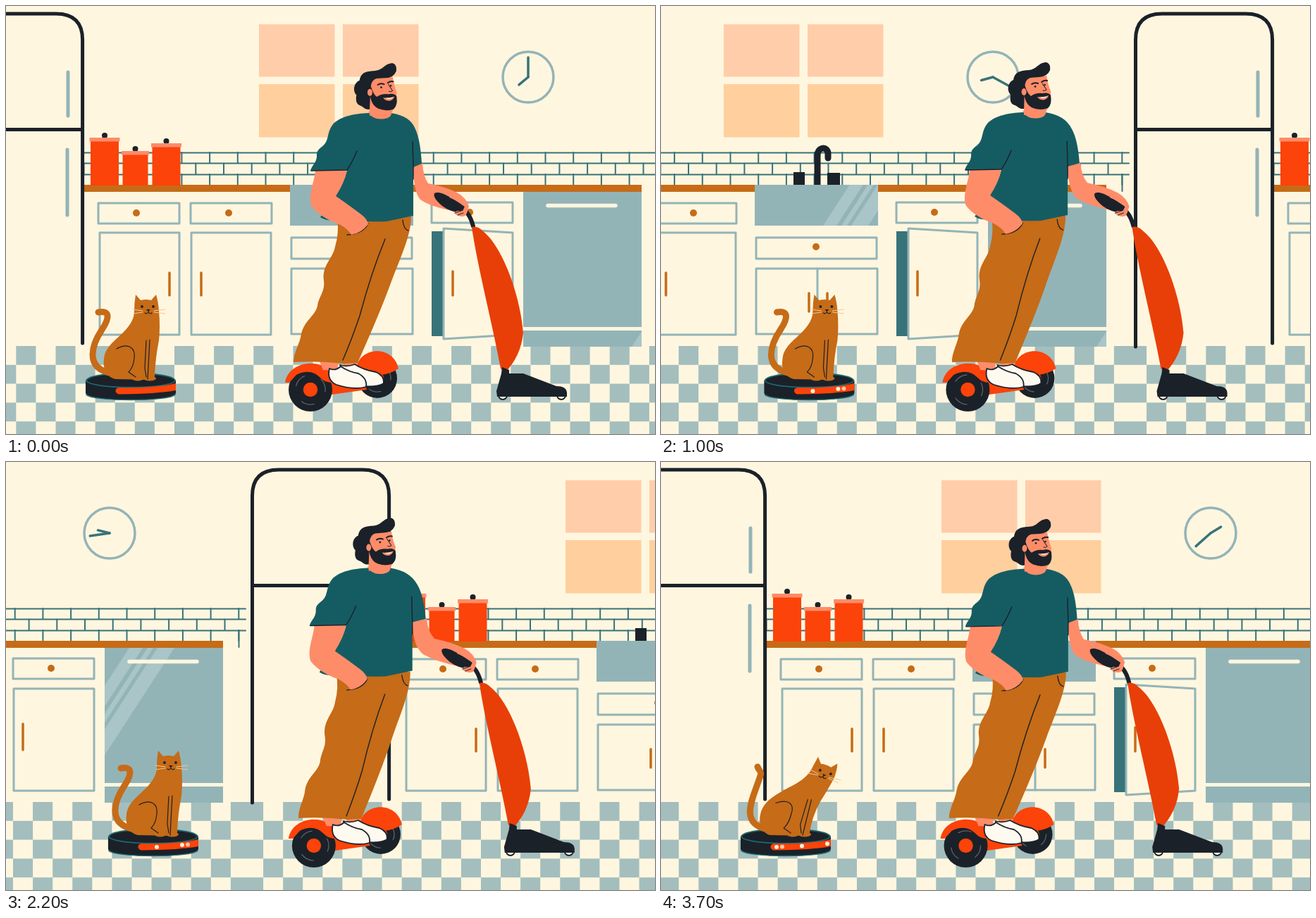
These frames come from a looping animation (921 px wide and 608 px high, 3.8 s). An HTML page with a canvas:

```html
<!DOCTYPE html>
<html lang="en">
<head>
<meta charset="utf-8">
<title>Kitchen ride</title>
<style>
  html, body { margin: 0; width: 100%; height: 100%; overflow: hidden; background: #fff6df; }
  canvas { display: block; }
</style>
</head>
<body>
<canvas id="stage" width="921" height="608"></canvas>
<script>
const ctx = document.getElementById('stage').getContext('2d');
const CREAM = '#fff6df', INK = '#1b2129', MIST = '#93b4b7', TILE = '#a3bebd', TEAL = '#155c62',
  SEA = '#38737a', BROWN = '#c66b17', ORANGE = '#fb430a', SKIN = '#ff8c69', RED = '#e83f08';
const LOOP = 3800, STEP = 100, SPAN = 1029, TAU = Math.PI * 2;

const clamp = v => Math.min(1, Math.max(0, v));
const ease = (t, a, b) => { const u = clamp((t - a) / (b - a)); return u * u * (3 - 2 * u); };

function fill(path, color) {
  ctx.fillStyle = color;
  ctx.fill(new Path2D(path));
}
function line(path, color, width) {
  ctx.strokeStyle = color;
  ctx.lineWidth = width;
  ctx.stroke(new Path2D(path));
}
function box(x, y, w, h, color) {
  ctx.fillStyle = color;
  ctx.fillRect(x, y, w, h);
}
function frame(x, y, w, h) {
  line(`M${x} ${y}h${w}v${h}h${-w}Z`, MIST, 3);
}
function oval(x, y, rx, ry, color) {
  ctx.beginPath();
  ctx.ellipse(x, y, rx, ry, 0, 0, TAU);
  ctx.fillStyle = color;
  ctx.fill();
}
const dot = (x, y, r, color) => oval(x, y, r, r, color);
function ring(x, y, r, color, width, from = 0, to = TAU) {
  ctx.beginPath();
  ctx.arc(x, y, r, from, to);
  ctx.strokeStyle = color;
  ctx.lineWidth = width;
  ctx.stroke();
}
// Moves every "x y" pair of a path through a function
const bend = (path, move) =>
  path.replace(/([\d.]+) ([\d.]+)/g, (_, x, y) => move(+x, +y).join(' '));
function group(draw) {
  ctx.save();
  draw();
  ctx.restore();
}

function floor() {
  const w = 28.08;
  box(-98, 483, SPAN, 125, CREAM);
  for (let row = 0; row < 5; row++)
    for (let i = row % 2; i * w < SPAN; i += 2)
      box(-98 + i * w, 483 + row * 26.8, Math.min(w, SPAN - i * w), 26.8, TILE);
}

function bricks() {
  for (const y of [208.5, 223.5, 239.5]) line(`M110 ${y}H934`, SEA, 2);
  for (let row = 0; row < 3; row++)
    for (let x = row === 1 ? 110.5 : 130.3; x < 930; x += 39.7)
      line(`M${x} ${208 + row * 15.5}v15`, SEA, 2);
  line('M924.5 239V263', SEA, 2);
}

function clock(minute, hour) {
  const hand = (deg, len) => {
    const a = deg * TAU / 360;
    line(`M741 101l${Math.sin(a) * len} ${-Math.cos(a) * len}`, SEA, 3.5);
  };
  ring(741, 101, 36, MIST, 3.5);
  hand(minute, 28);
  hand(hour, 17);
}

function jar(x, y, w) {
  dot(x + w / 2, y - 3, 4, INK);
  box(x, y + 3, w, 252 - y, ORANGE);
  box(x - 1.5, y, w + 3, 5.5, SKIN);
}

// Slanted gleam inside a panel; x is its left edge on the panel's floor
function gleam(x, left, top, w, h) {
  group(() => {
    ctx.beginPath();
    ctx.rect(left, top, w, h);
    ctx.clip();
    for (const [dx, thick] of [[0, 19], [26, 8], [40, 24]]) {
      const slide = h * 0.65;
      fill(`M${x + dx} ${top + h}h${thick}l${slide} ${-h}h${-thick}Z`, '#a9c5c7');
    }
  });
}

function cupboards(shut) {
  for (const [x, y] of [[131, 280], [262, 280], [604, 279]]) {
    frame(x, y, 115, 29);
    dot(x + 54, y + 14, 5, BROWN);
  }
  frame(133, 322, 113, 145);
  frame(263, 322, 113, 145);
  frame(405, 329, 171, 30);
  dot(490, 342, 5, BROWN);
  frame(405, 373, 172, 93);
  line('M492 373V466', MIST, 3);
  line('M232 379V411M277 379V411M480 408V434M506 408V434', BROWN, 3.5);
  const x = 621 - 16 * shut, skew = 6 * (1 - shut);
  box(604, 320, 17 * (1 - shut), 149, SEA);
  line(`M${x} ${322 - skew}L719 322V467L${x} ${467 + skew}Z`, MIST, 3);
  const hx = 634 - 16 * shut;
  line(`M${hx} ${377 - 5 * shut}V${411 - 2 * shut}`, BROWN, 3.5);
}

function kitchen(shift, t, first) {
  group(() => {
    ctx.translate(shift, 0);
    floor();
    for (const x of [359, 478]) {
      box(x, 26, 107.5, 74.5, '#ffcda9');
      box(x, 111, 107.5, 75.5, '#ffcf9e');
    }
    clock(119 * t + (first ? 0 : 148), 24.5 * t + (first ? 230 : 328));
    bricks();
    box(111, 254, 791, 10, BROWN);
    jar(120, 187, 40);
    jar(165.5, 206, 36);
    jar(207.5, 195, 40);

    cupboards(first ? ease(t, 1.1, 1.6) : 0);
    box(458, 236, 16, 18, INK);
    box(506, 237, 18, 17, INK);
    line('M492 254V213C492 199 507 199 507 210V216', INK, 9);
    box(403, 254, 175, 58, MIST);
    box(734, 264, 168, 220, MIST);
    if (first) {
      gleam(500 - 400 * (t - 1), 403, 254, 175, 58);
      gleam(888 - 400 * Math.max(0, t - 1.545), 734, 264, 168, 220);
    }
    line('M769 283.5H865', CREAM, 5.5);
    box(734, 456, 168, 5, CREAM);

    line('M-85.5 484V48Q-85.5 11 -48 11H71Q108.6 11 108.6 48V479M-85 175.5H108', INK, 5);
    line('M88 94V156M87 204V297', MIST, 5);
  });
}

const TAILS = [
  [108, 515, 124, 478, 136, 460, 147, 432, 131, 435],
  [116, 506, 120, 475, 129, 457, 140, 444, 149, 438],
  [114, 515, 127, 485, 136, 460, 142, 445, 137, 433]
];

function cat(t) {
  const x = 39.5 * (ease(t, 0, 1.33) - ease(t, 1.85, 3.1));
  const lean = ease(t, 3.1, 3.5);
  const flick = ease(t, 1.4, 1.75) - ease(t, 1.85, 2.2);
  const bow = (px, py) => {
    const a = 0.34 * lean * clamp((528 - py) / 100), dx = px - 178, dy = py - 528;
    return [178 + dx * Math.cos(a) - dy * Math.sin(a), 528 + dx * Math.sin(a) + dy * Math.cos(a)];
  };
  const part = (path, color) => fill(bend(path, bow), color);
  const mark = (path, color = INK, width = 1.2) => line(bend(path, bow), color, width);

  group(() => {
    ctx.translate(x, 0);
    fill('M113 533V550C116 563 238 563 241 550V533Z', INK);
    oval(177, 533, 64, 12, INK);
    line('M114 532C118 518 236 518 240 532C235 545 119 545 114 532', '#1d6870', 1.8);
    line('M114 552C122 562 232 562 240 552', '#1d6870', 1.5);
    fill('M160 542Q212 543 241 536V546Q215 551 160 551.5C154 550 154 543 160 542Z', ORANGE);
    for (let k = 0; k < 7; k++) {
      const lx = 158 + 60 * (t - 0.6 * k);
      if (lx < 161 || lx > 238) continue;
      const y = 547 - 5 * clamp((lx - 185) / 53);
      dot(lx, y, 3, '#fff0dc');
      if (k % 2 === 0 && lx < 230) dot(lx + 8, y - 0.5, 3, '#ffc2a2');
    }

    const p = TAILS[0].map((v, i) => v + flick * (TAILS[1][i] - v) + lean * (TAILS[2][i] - v));
    line(`M152 522C${p.slice(0, 6).join(' ')}S${p.slice(6).join(' ')}`, BROWN, 9);
    part('M184 410L191 418Q199 416 206 418L213 410Q216 420 217 433Q219 455 217 475Q212 500 211 526' +
      'Q211 531 205 531L155 530C143 527 137 515 139 502C140 485 155 475 166 464' +
      'C178 452 182 443 182 433Q182 422 184 410Z', BROWN);
    oval(187, 529.5, 8, 3, BROWN);
    oval(204, 529, 9, 3.5, BROWN);
    mark('M157 487C173 478 184 485 182 500Q181 513 174 520L184 527');
    mark('M199 475L197 514L199 527M204 474L201 530');
    for (const [ex, ey] of [[193, 427], [209, 427]]) dot(...bow(ex, ey), 1.9, INK);
    part('M199 431L205 431L202 434Z', INK);
    mark('M202 433L202 435Q200 438 197 436M202 435Q204 438 207 436');
    mark('M194 433L180 431M194 435L181 437M210 433L226 431M210 435L226 437', '#f2c795', 1);
  });
}

function wheel(x, y, r, spin) {
  dot(x, y, r, INK);
  for (const a of [0, 2.1, 4.2]) ring(x, y, r * 0.68, '#5d6266', 1.3, spin + a, spin + a + 0.9);
  dot(x, y, r * 0.33, ORANGE);
}

function board(t, dx) {
  const spin = t * 8.7 + 3.4;
  group(() => {
    ctx.translate(dx, 0);
    wheel(527, 529, 28, spin);
    fill('M496 518C500 482 550 481 557 515Q545 523 532 524Q515 533 500 530Z', ORANGE);
    fill('M455 535L508 536L512 545L462 552Z', ORANGE);
    wheel(432, 545, 31, spin);
    fill('M396 535C401 503 451 498 465 526L463 535Q452 535 446 528Q432 514 412 524L402 535Z', ORANGE);
    fill('M443 500L471 500L471 518L450 517ZM476 500L499 500L499 514L480 516Z', SKIN);
    const shoe = path => { fill(path, '#fffaf0'); line(path, INK, 1.8); };
    shoe('M474 510Q484 513 495 509Q507 517 525 520Q537 525 536 536Q526 542 506 540L480 521Z');
    shoe('M459 515Q467 519 475 512Q487 520 500 522Q513 529 511 541Q494 546 469 538Q455 532 459 515Z');
  });
}

function man(t) {
  const phase = t / LOOP * 1000 * 3;
  const d = 10 * (1 - Math.cos(phase * TAU));
  const upper = (x, y) => {
    const u = x - 578;
    return u <= 0 ? [x - 0.12 * d, y - 0.14 * d]
      : [x + d * Math.min(1, 0.1 + u * 0.035), y - 0.14 * d * clamp(1 - u / 60)];
  };
  const legs = (x, y) => {
    const u = (y - 300) / 208;
    return [x + d * (-0.12 + u * (x < 450 ? 0.78 : 0.6)), y - 0.12 * d * (1 - u)];
  };
  const part = (path, color, move = upper) => fill(bend(path, move), color);
  const mark = (path, color = INK, width = 1.4, move = upper) => line(bend(path, move), color, width);

  board(t, 0.45 * d);

  part('M470 303L575 299C575 325 560 357 547 391C533 430 516 468 499 507L479 508Q444 504 408 506' +
    'C408 492 417 480 419 466C423 447 439 440 442 426C444 412 453 406 451 390' +
    'C448 368 464 359 467 342Q473 322 470 303Z', BROWN, legs);
  mark('M538 331C524 365 510 410 502 440Q492 470 478 503', INK, 1.4, legs);
  mark('M484 325Q507 324 514 309M563 304Q564 317 571 319', INK, 1.3, legs);

  // Far arm, shirt, pocketed arm
  part('M578 226L591 223Q592 242 599 252Q624 257 640 265Q653 272 657 285L652 295L634 291' +
    'Q602 285 588 275Q578 264 578 226Z', SKIN);
  part('M514 152C496 153 475 156 464 168C456 178 458 188 453 195C449 201 441 203 441 211' +
    'C442 222 434 226 432 234L484 233C481 248 473 259 468 270L446 300Q455 306 472 304' +
    'Q505 307 540 306L578 298L578 229L590 224Q588 190 581 175Q574 156 546 152Z', TEAL);
  part('M439 234L484 233Q480 252 468 270Q484 281 504 296Q513 303 514 310Q504 323 490 325' +
    'Q486 317 473 310Q447 301 434 285C428 270 437 252 439 234Z', SKIN);
  mark('M498 206Q492 221 484 233L433 234');
  mark('M577 193L578 228L578 246');

  // Head
  const tilt = (1.5 + 1.5 * Math.cos((phase - 0.32) * TAU)) * TAU / 360;
  part('M514 150L547 150Q548 158 538 160Q520 163 514 150Z', SKIN);
  group(() => {
    ctx.translate(525 - 0.12 * d, 150 - 0.14 * d);
    ctx.rotate(tilt);
    ctx.translate(-525, -150);
    fill('M515 104L548 100Q550 113 554 122L553 140Q548 149 545 156L516 156Z', SKIN);
    fill('M501 106C503 93 513 93 523 92C535 91 536 81 548 81Q554 83 553 92Q549 102 537 102' +
      'L525 103Q518 105 517 115L516 147C509 148 507 143 503 142C496 140 496 133 497 127' +
      'C491 121 493 109 501 106Z', INK);
    fill('M517 113Q521 126 526 129Q533 124 542 125Q551 123 554 128Q556 141 550 146' +
      'Q540 150 529 146Q518 142 516 125Z', INK);
    oval(516, 123, 3.5, 5, SKIN);
    fill('M535 130Q543 131 551 128Q549 134 543 134.5Q537 134 535 130Z', SKIN);
    fill('M538 130.5Q543 131 549 129.5Q547 132 542 132Z', '#fff6ea');
    line('M527 112Q531 109 536 111M541 109Q545 106 549 107', INK, 2);
    line('M542 111L548 120Q546 122 543 121', INK, 1);
    dot(532, 115.5, 1.4, INK);
    dot(545.5, 113, 1.3, INK);
  });

  // Vacuum cleaner and gripping hand
  group(() => {
    ctx.translate(d, 0);
    line('M646 287Q658 293 663 313', INK, 6);
    fill('M608 266C616 261 635 274 651 285L647 294Q631 293 619 284Q605 272 608 266Z', INK);
    fill('M634 266Q648 270 655 280Q658 288 652 298Q643 301 636 294L640 291L648 291L651 285Q642 277 629 272Z', SKIN);
    line('M637 294L646 291M641 297L649 294', INK, 1);
    fill('M661 314Q669 312 677 320C705 342 730 412 734 464Q731 497 708 521L702 515C691 455 668 365 661 314Z', RED);
    for (const x of [705, 788]) {
      dot(x, 553, 6, CREAM);
      ring(x, 553, 6, INK, 1.8);
    }
    fill('M704 513L714 517V522L734 522L781 540Q795 540 796 549V555H697L696 547L703 522Z', INK);
  });
}

function draw(now) {
  const n = Math.floor(now % LOOP / STEP), t = n / 10;
  const scroll = Math.min(27 * n, 990);
  ctx.lineCap = ctx.lineJoin = 'round';
  box(0, 0, 921, 608, CREAM);
  kitchen(-scroll, t, true);
  kitchen(SPAN - scroll, t, false);
  cat(t);
  man(t);
}

let start;
function tick(now) {
  start ??= now;
  draw(now - start);
  requestAnimationFrame(tick);
}
draw(0);
requestAnimationFrame(tick);
</script>
</body>
</html>
```
